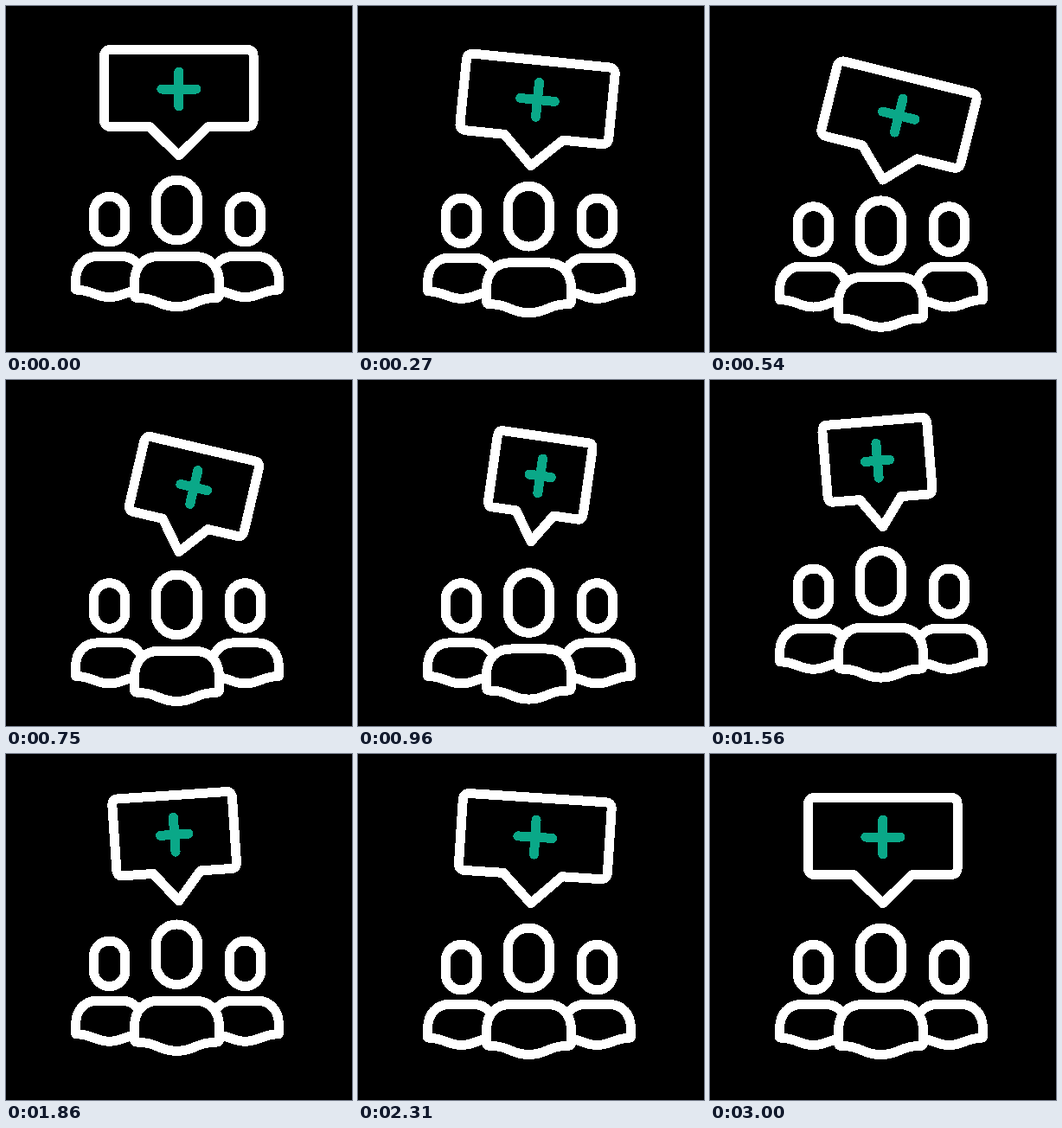
An HTML page for the animation above (3.09 s loop, 400x400 px).

```html
<!DOCTYPE html>
<html lang="en">
<head>
<meta charset="utf-8">
<title>Group with speech bubble</title>
<style>
  html, body { margin: 0; width: 100%; height: 100%; overflow: hidden; background: #000; }
  svg { display: block; width: 100%; height: 100%; shape-rendering: crispEdges; }
  svg * { vector-effect: non-scaling-stroke; }
  .line { fill: none; stroke: #fff; stroke-width: 11; stroke-linecap: round; stroke-linejoin: round; }
  .plus { stroke: #0aa888; }
  .solid { fill: #000; }
</style>
</head>
<body>
<svg viewBox="0 0 400 400">
  <defs>
    <g id="side">
      <rect x="101.3" y="220.3" width="36.6" height="52.6" rx="18.3"/>
      <path d="M158 316C158 301 148 289.5 134 289.5H105C91 289.5 80.7 301 80.7 316V328
               C101 328.5 103 336.5 119.5 336.5C136 336.5 138 328.5 156 329"/>
    </g>
  </defs>
  <g id="sides" class="line">
    <use href="#side"/>
    <use href="#side" transform="translate(396 0) scale(-1 1)"/>
  </g>
  <g id="center" class="line">
    <rect x="173.2" y="201.2" width="48.6" height="69.6" rx="24.3"/>
    <path class="solid" d="M177 289.5H218C236 289.5 246.5 301 246.5 320V334Q246.5 337.5 243 337.5
             C219 337.5 219 347.6 197.5 347.6C176 347.6 176 337.5 152 337.5
             Q148.5 337.5 148.5 334V320C148.5 301 159 289.5 177 289.5Z"/>
  </g>
  <!-- the tail tip is the local origin -->
  <g id="bubble" class="line">
    <path d="M0 0L-34-33.2H-78.3Q-86.3-33.2-86.3-41.2V-114.3Q-86.3-122.3-78.3-122.3
             H78.3Q86.3-122.3 86.3-114.3V-41.2Q86.3-33.2 78.3-33.2H34Z"/>
    <path class="plus" d="M-20-76.7H20M0-96.7V-56.7"/>
  </g>
</svg>
<script>
  const LOOP = 3090, STEP = 30;

  const easeInOut = power => u =>
    u < 0.5 ? (2 * u) ** power / 2 : 1 - (2 - 2 * u) ** power / 2;
  const soft = easeInOut(2), strong = easeInOut(3);

  // Eases between poses given as [time in ms, value]; holds outside them
  const track = (ease, ...keys) => t => {
    const next = keys.findIndex(([time]) => time > t);
    if (next < 0) return keys[keys.length - 1][1];
    if (next === 0) return keys[0][1];
    const [t0, v0] = keys[next - 1], [t1, v1] = keys[next];
    return v0 + (v1 - v0) * ease((t - t0) / (t1 - t0));
  };

  // People crouch, spring up and settle; the bubble dips, tilts and narrows
  const centerY = track(strong, [0, 0], [640, 24], [1780, -4.3], [2450, 0]);
  const sidesY = track(strong, [0, 0], [860, 14.5], [1860, -4.3], [2350, 0]);
  const tipY = track(soft, [0, 0], [590, 28.8], [1360, -3], [1800, -3], [2310, 0]);
  const turn = track(soft, [0, 0], [600, 14.2], [1500, -4.7], [1700, -4.7], [2400, 4], [3000, 0]);
  const width = track(soft, [380, 1], [1080, 0.62], [1500, 0.7], [2360, 1]);

  const place = (id, value) => document.getElementById(id).setAttribute('transform', value);

  function draw(t) {
    place('center', `translate(0 ${centerY(t)})`);
    place('sides', `translate(0 ${sidesY(t)})`);
    place('bubble', `translate(199.8 ${172.7 + tipY(t)}) rotate(${turn(t)}) scale(${width(t)} 1)`);
  }

  const start = performance.now();
  function tick() {
    const t = (performance.now() - start) % LOOP;
    draw(Math.min(Math.floor(t / STEP) * STEP, 3000));
    requestAnimationFrame(tick);
  }
  tick();
</script>
</body>
</html>
```
